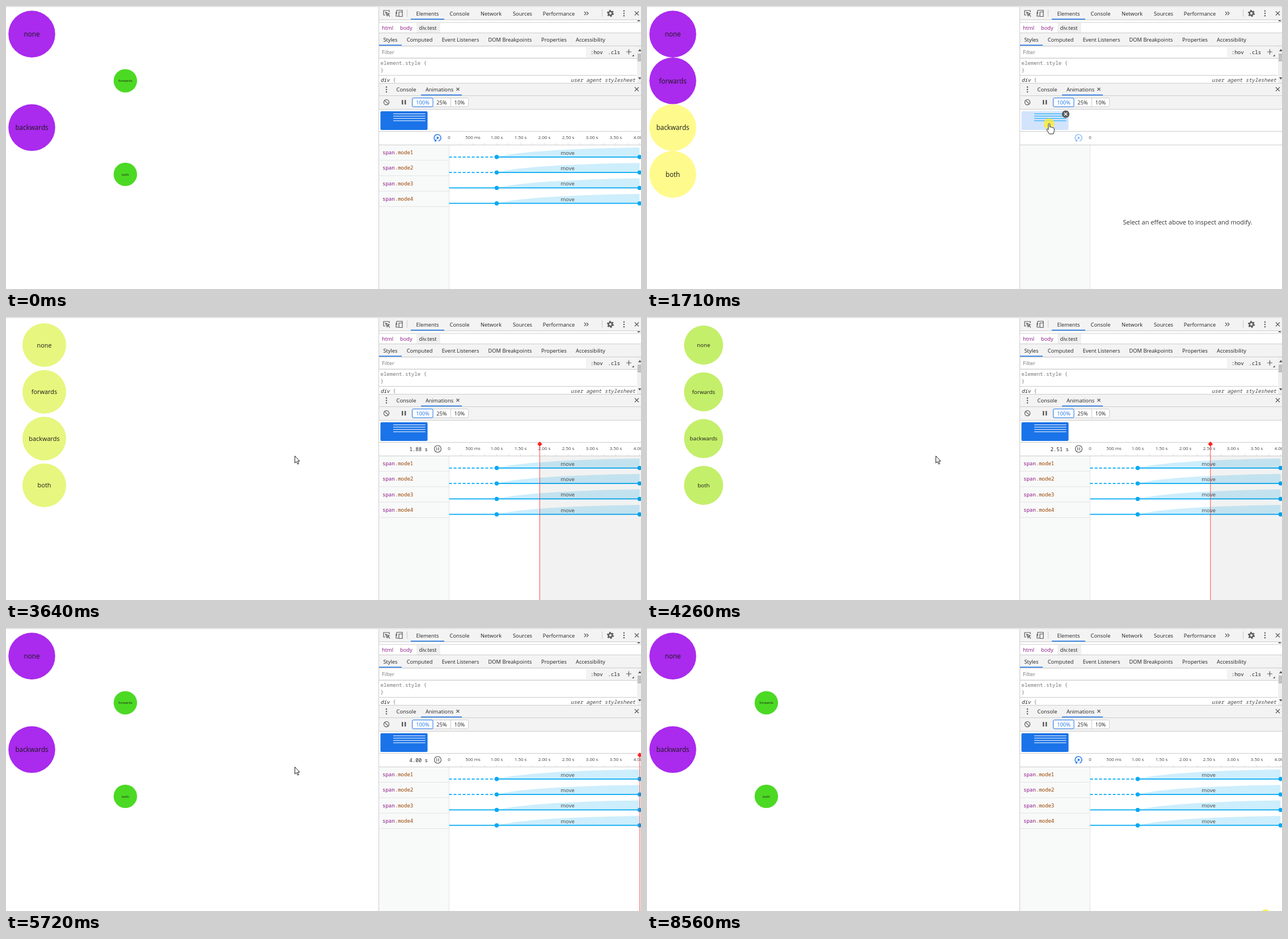
Recreate the animation shown at these times as an HTML page. Size 1120x500 px, loop 8650 ms.

```html
<!DOCTYPE html>
<html lang="en">
<head>
<meta charset="utf-8">
<title>animation-fill-mode</title>
<style>
html, body { margin: 0; width: 100%; height: 100%; overflow: hidden; background: #fff; }
svg { display: block; width: 1120px; height: 500px; }
text { font: 9.3px "Open Sans", "Noto Sans", sans-serif; fill: #444; white-space: pre; }
.mid { text-anchor: middle; }
.end { text-anchor: end; }
.mono { font: 9.05px "Noto Sans Mono", "DejaVu Sans Mono", monospace; }
.slant { font-style: italic; }
.tick { font-size: 7.9px; }
.move { font-size: 9.6px; }
.hint { font-size: 11px; fill: #333; }
.ball text { font-size: 11.7px; fill: #1a1a1a; }
.tag { fill: #881280; }
.cls { fill: #994500; }
.dark { fill: #222; }
.soft { fill: #777; }
.blue { fill: #1a73e8; }
.line { stroke: #ccc; fill: none; }
.icon { stroke: #5a5a5a; stroke-width: 1.2; fill: none; }
.gear { stroke-width: 2.3; }
.track { stroke: #03a9f4; stroke-width: 1.7; }
</style>
</head>
<body>
<svg viewBox="0 0 1120 500">
  <path class="line" d="M0 1H1120"/>
  <g id="balls"></g>

  <g id="panel">
    <path fill="#f3f3f3" d="M658 2H1120V24H658ZM658 48H1120V92H658ZM658 137H1120V182H658Z"/>
    <path fill="#fff" d="M659 73H1023V90H659Z"/>
    <path fill="#f0f0f0" d="M724 30H766V47H724ZM1113 71H1120V136H1113Z"/>
    <path fill="#f8f9f9" d="M658 246H781V500H658Z"/>
    <path fill="#c1c1c1" d="M1114 84H1120V98H1114Z"/>
    <path fill="#555" d="M1115 80l3-4 2 3v1ZM1115 126h5l-2 4ZM1113 27l3-3 3 3Z"/>
    <path class="line" d="M657.5 2V500M658 24.5H1120M658 29H1120M658 47.5H1120M658 70.5H1120M658 92.5H1120M658 122.5H1112M658 136.5H1120M658 158.5H1120M658 182.5H1120M658 221.5H1120M658 245.5H1120M707.5 6V19M1051.5 6V19"/>
    <path stroke="#e4e4e4" d="M781.5 246V500"/>
    <path class="blue" d="M714 22.400h59v1.600h-59ZM658 68.400h40v1.600h-40ZM732 156.400h72v1.600h-72Z"/>

    <path class="icon" d="M669 16H666V8H676V11M669.500 11l6.500 2.600-2.800 1-1 2.800ZM673 14.500l4 4M688 10.500V18H692M689 7.500H699V10M689 7.500V14M693 10.500H699V18.500H693Z"/>
    <path class="icon" d="M1020 10l3 3-3 3M1024 10l3 3-3 3M1109 9.500l7 7m0-7l-7 7M1109 143.500l7 7m0-7l-7 7M794.500 144.500l5 5m0-5l-5 5M1094 81h9M1098.500 76.500v9"/>
    <path fill="#555" d="M1104 89l3.500-3.500V89Z"/>
    <circle class="icon gear" cx="1066" cy="13" r="3.300"/>
    <circle class="icon gear" cx="1066" cy="13" r="5" stroke-dasharray="2.600 2.640"/>
    <g fill="#5a5a5a">
      <circle cx="1090" cy="8.800" r="1.200"/><circle cx="1090" cy="13" r="1.200"/><circle cx="1090" cy="17.200" r="1.200"/>
      <circle cx="671" cy="143.300" r="1.200"/><circle cx="671" cy="147.500" r="1.200"/><circle cx="671" cy="151.700" r="1.200"/>
      <path d="M698 166h2.400v8H698ZM703 166h2.400v8H703Z"/>
    </g>
    <circle class="icon" cx="671" cy="170" r="4.600"/><path class="icon" d="M667.800 166.800l6.400 6.400"/>
    <rect x="716.500" y="162.500" width="99" height="15.500" rx="2" fill="#fff" stroke="#ccc"/>
    <path class="line" d="M784.500 162.500V178"/>
    <rect x="716.500" y="162.500" width="36.500" height="15.500" rx="2" fill="#fff" stroke="#1a73e8"/>

    <text class="soft" x="663" y="85">Filter</text>
    <text class="tag" x="663" y="42">html</text>
    <text class="tag" x="695" y="42">body</text>
    <text class="dark" x="728.500" y="42">div.test</text>
    <text class="mono dark" x="1031" y="84.500">:hov</text>
    <text class="mono dark" x="1061.500" y="84.500">.cls</text>
    <text class="mono soft" x="660.500" y="103.500">element.style {</text>
    <text class="mono soft" x="660.500" y="117">}</text>
    <text class="mono soft" x="660.500" y="134"><tspan class="dark slant">div</tspan> {</text>
    <text class="mono end slant" x="1110" y="134">user agent stylesheet</text>
  </g>

  <g id="thumb">
    <rect id="card" x="660.400" y="186" width="83.100" height="33" rx="2"/>
    <path id="bars" d="M683 190.500h56.500M683 194.600h56.500M683 198.700h56.500M683 202.800h56.500"/>
    <g id="close">
      <circle cx="738.500" cy="191" r="6.600" fill="#5a5a5a"/>
      <path stroke="#fff" stroke-width="1.300" d="M735.800 188.300l5.400 5.400m0-5.400l-5.400 5.400"/>
    </g>
  </g>

  <g id="replay" fill="none" stroke="#1a73e8" stroke-width="1.400">
    <path d="M757.500 237.900A6 6 0 1 1 763 238.700M755.800 238.600h2.600v-2.800"/>
    <path d="M759.800 230.200v5.600l4.200-2.800Z" fill="#1a73e8" stroke="none"/>
  </g>
  <g id="pause" class="icon">
    <circle cx="761.500" cy="233" r="6"/><path d="M759.800 230.300v5.400M763.200 230.300v5.400"/>
  </g>
  <text class="tick mid" x="781.500" y="234.500">0</text>
  <text id="hint" class="hint mid" x="953.500" y="386">Select an effect above to inspect and modify.</text>
  <g id="rows"></g>
  <g id="scrub">
    <text id="clock" class="mono end dark" x="744" y="237"></text>
    <rect id="shade" y="246" height="254" fill-opacity=".05"/>
    <g id="head" fill="#f22">
      <path d="M0 220l4.300 4.500-4.300 4.500-4.300-4.500Z"/><path d="M-.5 226h1V500h-1Z" fill-opacity=".8"/>
    </g>
  </g>

  <circle id="halo" r="9.500" fill="#fe2" fill-opacity=".75"/>
  <g id="cursor" fill="#fff" stroke="#222" stroke-linejoin="round">
    <path id="arrow" d="M.5 .5V13L3.300 10.400 5.300 15 7.300 14.200 5.300 9.700H9Z"/>
    <path id="hand" d="M0 1.500Q1.500-.8 2.700 1.500V7Q4.500 6 5.400 7.500 7 6.700 7.800 8.200 9.800 7.600 10.300 9.500V13.500L8.700 19H1.500L-3.200 11.500Q-2.800 9.200 0 11.300Z"/>
  </g>
</svg>
<script>
const LOOP = 8650, STEP = 77, LAG = 16;
const RESET = 13, LISTED = 14, HOVER = 18, CLICK = 22, PLAY = 23, LEAVE = 26, DONE = 74, IDLE = 76, LAST = 111;
const $ = id => document.getElementById(id);
const show = (id, on) => $(id).setAttribute('display', on ? 'inline' : 'none');

function add(parent, name, attrs, text) {
  const node = document.createElementNS('http://www.w3.org/2000/svg', name);
  for (const key in attrs) node.setAttribute(key, attrs[key]);
  if (text) node.textContent = text;
  return parent.appendChild(node);
}
const label = (parent, text, x, y, cls = '') => add(parent, 'text', { x, y, class: 'mid ' + cls }, text);

const tabs = [
  [16.6, { Elements: 743.5, Console: 800, Network: 855.5, Sources: 911, Performance: 975 }],
  [62.8, { Styles: 678, Computed: 729.5, 'Event Listeners': 801.5, 'DOM Breakpoints': 889, Properties: 966.5, Accessibility: 1031 }],
  [151, { Console: 706, Animations: 764.5 }],
  [173.8, { '100%': 735, '25%': 768.5, '10%': 800 }]
];
for (const [y, row] of tabs)
  for (const name in row) label($('panel'), name, row[name], y, name === '100%' ? 'blue' : 'dark');

// Timeline: 84px per second, starting at 781.5
const timeX = ms => 781.5 + ms * 0.084;
for (let ms = 250; ms <= 4000; ms += 250) {
  const x = timeX(ms);
  add($('rows'), 'path', { d: `M${x} 242V245`, stroke: '#ddd' });
  if (ms % 500 === 0) label($('rows'), ms < 1000 ? ms + ' ms' : (ms / 1000).toFixed(2) + ' s', x, 234.5, 'tick');
}
for (let i = 0; i < 4; i++) {
  const g = add($('rows'), 'g', { transform: `translate(0 ${27.3 * i})` });
  add(g, 'path', { d: 'M658 272.500H781', stroke: '#e4e4e4' });
  const name = add(g, 'text', { x: 664, y: 262, class: 'mono' });
  add(name, 'tspan', { class: 'tag' }, 'span');
  add(name, 'tspan', { class: 'cls' }, '.mode' + (i + 1));
  add(g, 'path', { d: 'M865.500 266.800Q920 253 1117.500 250V266.800Z', fill: '#cdeefc' });
  add(g, 'path', { d: 'M781.500 266.800H865.500', class: 'track', 'stroke-dasharray': i < 2 ? '5 3' : 'none' });
  add(g, 'path', { d: 'M865.500 266.800H1117.500', class: 'track' });
  for (const x of [865.5, 1117.5]) add(g, 'circle', { cx: x, cy: 266.8, r: 3.7, fill: '#03a9f4' });
  label(g, 'move', 990.5, 262.8, 'move');
}

const balls = ['none', 'forwards', 'backwards', 'both'].map((mode, i) => {
  const g = add($('balls'), 'g', { class: 'ball' });
  const disc = add(g, 'circle', { r: 41.3 });
  label(g, mode, 0, 4.35);
  return { g, disc, y: 49.6 + 82.6 * i, before: i > 1, after: i % 2 === 1 };
});

// cubic-bezier(.42, 0, 1, 1)
function easeIn(x) {
  let lo = 0, hi = 1, s = 0.5;
  for (let i = 0; i < 24; i++) {
    s = (lo + hi) / 2;
    const bx = 1.26 * s * (1 - s) ** 2 + 3 * (1 - s) * s * s + s ** 3;
    if (bx < x) lo = s; else hi = s;
  }
  return 3 * (1 - s) * s * s + s ** 3;
}
const mix = (a, b, p) => a + (b - a) * p;
const yellow = [255, 250, 140], green = [76, 217, 36], purple = '#aa2aee';

function placeBall(ball, p, styled) {
  ball.g.setAttribute('transform', `translate(${mix(45.5, 210.5, p)} ${ball.y}) scale(${1 - p / 2})`);
  ball.disc.setAttribute('fill', styled ? `rgb(${yellow.map((c, i) => Math.round(mix(c, green[i], p)))})` : purple);
}

// Pointer stops: [step, x, y]
const stops = [
  [1, 967, 486], [5, 750, 400], [9, 560, 303], [11, 563, 300], [16, 650, 250], [20, 708, 207],
  [24, 708, 207], [28, 590, 234], [32, 509, 245], [81, 509, 245], [86, 590, 224],
  [93, 781, 328], [97, 905, 415], [102, 1026, 500]
];
function pointer(n) {
  const k = stops.findIndex(s => s[0] > n);
  if (k < 1) return null;
  const a = stops[k - 1], b = stops[k], p = (n - a[0]) / (b[0] - a[0]);
  return [mix(a[1], b[1], p), mix(a[2], b[2], p)];
}

function draw(n) {
  const ms = Math.min(4000, 965 + 77.85 * (n - 35));
  const playing = n >= PLAY && n < IDLE, empty = n >= RESET && n < PLAY;
  const ended = n < RESET || n >= DONE, moving = !ended && n >= PLAY && ms >= 1000;
  for (const b of balls) {
    if (ended) placeBall(b, b.after ? 1 : 0, b.after);
    else if (moving) placeBall(b, easeIn((ms + LAG - 1000) / 3000), true);
    else placeBall(b, 0, b.before);
  }

  const hover = n >= HOVER && n < LEAVE;
  show('rows', !empty);
  show('hint', empty);
  show('thumb', n < RESET || n >= LISTED);
  show('close', hover);
  $('card').setAttribute('fill', empty ? '#d2e3fc' : '#1a73e8');
  $('bars').setAttribute('stroke', empty ? '#03a9f4' : '#fff');

  show('replay', !playing);
  $('replay').setAttribute('opacity', empty ? 0.5 : 1);
  show('pause', playing);
  show('scrub', playing);
  if (playing) {
    const x = timeX(ms) + 0.4, t = ms === 4000 ? ms : ms - LAG;
    $('head').setAttribute('transform', `translate(${x} 0)`);
    $('shade').setAttribute('x', x);
    $('shade').setAttribute('width', 1120 - x);
    $('clock').textContent = t < 1000 ? Math.round(t) + ' ms' : (t / 1000).toFixed(2) + ' s';
  }

  const at = pointer(n);
  show('cursor', at);
  show('hand', hover);
  show('arrow', !hover);
  if (at) $('cursor').setAttribute('transform', `translate(${at})`);
  show('halo', n === CLICK || n === PLAY || n >= LAST);
  $('halo').setAttribute('transform', n >= LAST ? 'translate(1091 506.500)' : 'translate(709 208)');
}

const start = performance.now();
function tick() {
  const time = (performance.now() - start) % LOOP;
  draw(Math.floor((time + 7) / STEP));
  requestAnimationFrame(tick);
}
tick();
</script>
</body>
</html>
```
